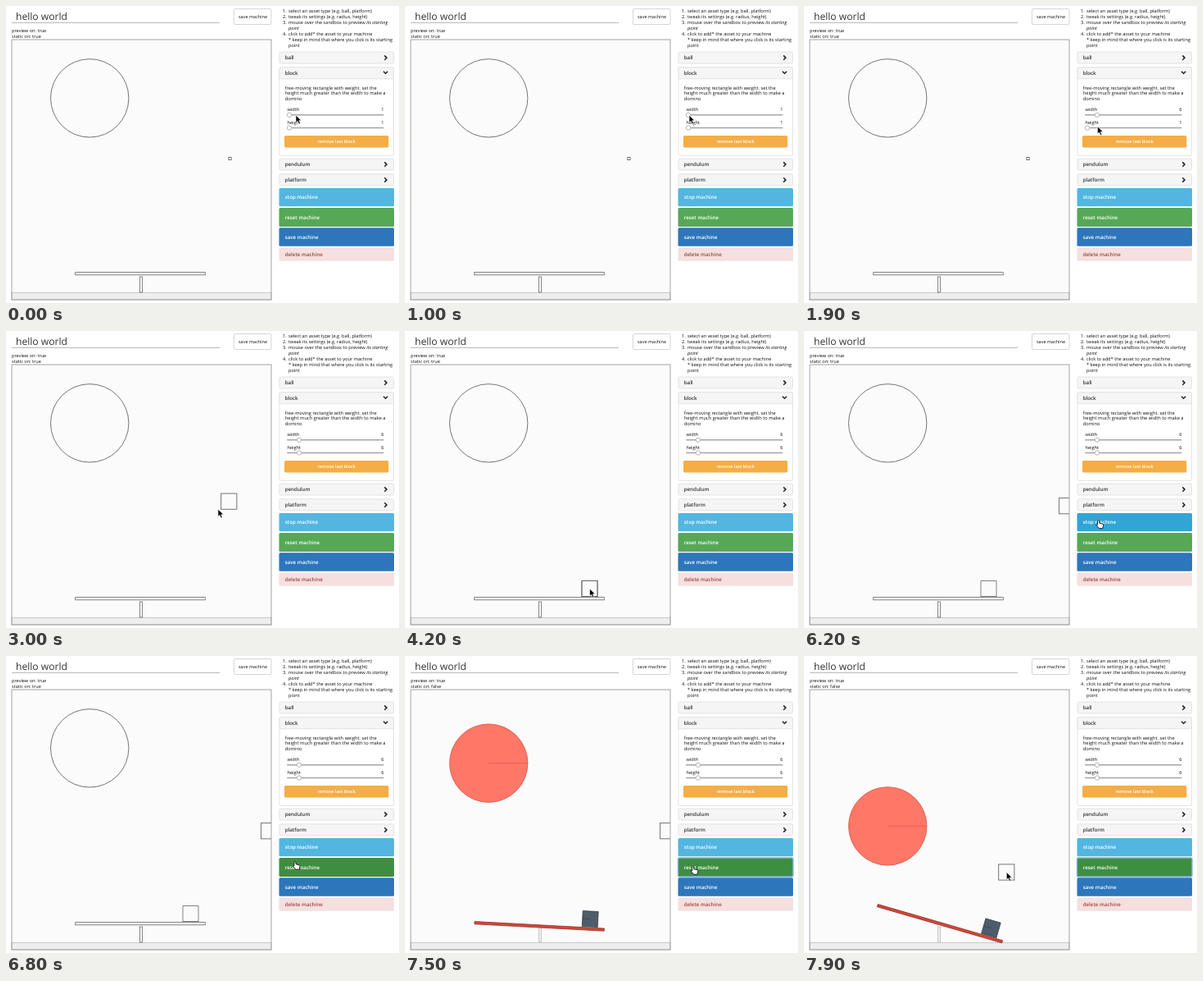
These frames come from a looping animation (480x362 px, 8 s). An HTML page:

```html
<!DOCTYPE html>
<html>
<head>
<meta charset="utf-8">
<style>
html, body { margin: 0; width: 100%; height: 100%; overflow: hidden; background: #fff; }
svg { display: block; width: 480px; height: 362px; }
text { font-family: "Open Sans", "Noto Sans", sans-serif; font-weight: 500; fill: #111; white-space: pre; text-rendering: geometricPrecision; }
.head { font-weight: 600; fill: #333; }
.btn { font-weight: 600; fill: #fff; }
.wire { fill: none; stroke: #666; stroke-width: .9; }
</style>
</head>
<body>
<svg id="stage" viewBox="0 0 480 362">
  <clipPath id="box"><rect x="7" y="41" width="317" height="317"/></clipPath>
  <g id="ui"></g>
  <g clip-path="url(#box)">
    <rect id="post" x="163.4" y="330" width="3.2" height="19" stroke-width=".8"/>
    <g id="seesaw" stroke-width=".8">
      <rect id="plank" x="-79.3" y="-1.6" width="158.6" height="3.2"/>
      <g id="block">
        <rect x="52" y="-21.6" width="19" height="19"/>
        <path id="tick" d="M61.5-12h-9" stroke-width=".8"/>
      </g>
    </g>
    <g id="ball" stroke-width=".9">
      <circle r="47.7"/>
      <path id="spoke" d="M0 0h47.7" stroke-width=".8"/>
    </g>
    <rect id="preview" class="wire"/>
  </g>
  <rect class="wire" x="7" y="41" width="317" height="317" style="stroke:#999"/>
  <g id="arrow"><path d="M0 0v9.2l2.1-1.9 1.6 3.6 1.7-.8-1.6-3.4h3z" fill="#000" stroke="#fff" stroke-width=".7"/></g>
  <g id="hand"><path d="M0 .8Q.8-.6 1.7.8l.5 3 4 1q1 .4.8 2l-.8 3.4h-4.3l-3.6-4q.2-1.2 1.6-.2z" fill="#fff" stroke="#111" stroke-width=".9"/></g>
</svg>
<script>
const $ = id => document.getElementById(id);
const ui = $('ui');

function set(el, attrs) {
  for (const k in attrs) el.setAttribute(k, attrs[k]);
  return el;
}
function add(tag, attrs) {
  return ui.appendChild(set(document.createElementNS('http://www.w3.org/2000/svg', tag), attrs));
}
function text(x, y, size, str, attrs) {
  const el = add('text', { x, y, 'font-size': size, ...attrs });
  el.innerHTML = str;
  return el;
}
function rect(x, y, width, height, fill, stroke = 'none', rx = 1.5) {
  return add('rect', { x, y, width, height, fill, stroke, rx, 'stroke-width': .8 });
}
const italic = s => `<tspan font-style="italic">${s}</tspan>`;

// left side
text(12, 16.8, 12.1, 'hello world', { style: 'fill:#333' });
add('path', { d: 'M7 20.3H261', stroke: '#aaa', 'stroke-width': .9 });
rect(278.5, 3.5, 45.5, 19, '#fff', '#ccc');
text(301.5, 15, 5.5, 'save machine', { 'text-anchor': 'middle' });
text(7, 32.3, 5.6, 'preview on: true');
const staticText = text(7, 39, 5.6, '');
rect(7, 41, 317, 317, '#fbfbfb', 'none', 0);
rect(7, 349.3, 317, 8.7, '#eee', '#bbb', 0);

// instructions
[
  ['1.', 'select an asset type (e.g. ball, platform)'],
  ['2.', 'tweak its settings (e.g. radius, height)'],
  ['3.', 'mouse over the sandbox to preview ' + italic('its starting')],
  ['', italic('point')],
  ['4.', 'click to add* the asset to your machine'],
  ['', '* keep in mind that where you click is its starting'],
  ['', 'point']
].forEach(([num, line], i) => {
  text(338, 8 + i * 6.95, 5.65, num);
  text(345, 8 + i * 6.95, 5.65, line);
});

// accordion
rect(334, 75, 139.5, 107.5, '#fff', '#ddd');
const heads = {};
[['ball', 56], ['block', 74.7], ['pendulum', 186], ['platform', 204.8]].forEach(([name, y]) => {
  rect(334, y, 139.5, 14, '#f5f5f5', '#ddd');
  heads[name] = text(340.7, y + 9.2, 6.2, name, { class: 'head' });
  const d = name == 'block' ? `M461 ${y + 5}l2.6 2.6 2.6-2.6` : `M462.3 ${y + 4.4}l2.7 2.7-2.7 2.7`;
  add('path', { d, fill: 'none', stroke: '#222', 'stroke-width': 1.5 });
});
['free-moving rectangle with weight. set the', 'height much greater than the width to make a', 'domino']
  .forEach((line, i) => text(340.7, 101.6 + i * 6.75, 5.75, line));

function slider(name, y) {
  text(343.5, y - 4.6, 5.6, name);
  const value = text(461.5, y - 4.6, 5.6, '', { 'text-anchor': 'end' });
  rect(343, y - .8, 118.5, 1.6, '#a5a5a5', 'none', .8);
  const knob = add('circle', { cy: y, r: 2.7, fill: '#fff', stroke: '#999', 'stroke-width': .7 });
  return v => {
    value.textContent = v;
    set(knob, { cx: 343.6 + v * 2.4 });
  };
}
const setWidth = slider('width', 132.8), setHeight = slider('height', 148.5);
rect(340, 158, 127.3, 14.4, '#f5ad45');
text(403.7, 167.2, 5.45, 'remove last block', { class: 'btn', 'text-anchor': 'middle' });

// machine buttons
function button(label, y, h, fill, attrs = { class: 'btn' }) {
  const el = rect(333.5, y, 140.5, h, fill);
  text(340.7, y + h / 2 + 2.1, 6.2, label, attrs);
  return el;
}
const stop = button('stop machine', 222, 22.3, '#53b6e0');
const reset = button('reset machine', 246, 23, '#56a857');
button('save machine', 270.3, 22.5, '#2d76bb');
button('delete machine', 294.5, 16.3, '#f5dfdf', { style: 'fill:#9c4644;font-weight:600' });

// pointer path: time, x, y
const path = [
  [0, 354, 133], [600, 347, 133], [1000, 347, 133], [1600, 358.5, 133], [1700, 358.5, 133],
  [1900, 358.5, 146.7], [2100, 347, 148], [2200, 347, 148], [2550, 358.5, 148], [2700, 358.5, 148],
  [2940, 272.5, 207.5], [3000, 259, 217], [3600, 227, 307], [3800, 225.5, 314], [4600, 225.5, 314],
  [4900, 321.5, 213], [5300, 366.5, 192], [5700, 366.5, 192], [6300, 357, 238], [6600, 352, 250],
  [6900, 352, 250], [7300, 350.8, 256], [7550, 350.8, 256], [7800, 247.3, 263.5], [8000, 247.3, 263.5]
];
function pointer(t) {
  const i = path.findIndex(p => p[0] > t), a = path[i - 1], b = path[i];
  const f = (t - a[0]) / (b[0] - a[0]);
  return [a[1] + (b[1] - a[1]) * f, a[2] + (b[2] - a[2]) * f];
}
const dragged = (t, start) => t < start ? 1 : t > start + 600 ? 6
  : Math.max(1, Math.min(6, Math.round(1 + (pointer(t)[0] - 347) / 2.3)));

function drawPreview(t) {
  const small = t < 2870, s = small ? 3.2 : 19.2;
  let [x, y] = pointer(Math.max(0, t - 60));
  if (small) [x, y] = [273.5, 186];
  else if (t > 4960 && t < 7700) [x, y] = [321.2, 213.2];
  set($('preview'), { x: x - s / 2, y: y - s / 2, width: s, height: s });
}

function drawMachine(t) {
  const fall = Math.max(0, t - 7205) / 695, live = fall > 0;
  const paint = (id, fill, stroke) => set($(id), { fill: live ? fill : 'none', stroke: live ? stroke : '#666' });
  paint('ball', '#ff7766', '#d9604f');
  paint('plank', '#c94a3d', '#a23228');
  paint('block', '#4e5d6c', '#36424e');
  paint('post', '#eee', '#bbb');
  set($('spoke'), { visibility: live ? 'visible' : 'hidden' });
  set($('tick'), { visibility: live ? 'visible' : 'hidden' });
  set($('block'), { visibility: t < 4000 ? 'hidden' : 'visible' });
  set($('ball'), { transform: `translate(102.2 ${112.3 + 94.8 * fall ** 1.925})` });
  const sag = 3.2 * Math.sin(Math.PI * Math.min(1, fall * 1.17));
  const angle = 16.1 * Math.min(1.03, fall ** 1.95);
  set($('seesaw'), { transform: `translate(${164 + 2 * fall ** 3} ${326.2 + sag}) rotate(${angle})` });
  staticText.textContent = 'static on: ' + !live;
}

function draw(t) {
  const [x, y] = pointer(t);
  const over = (a, b) => x > 334 && y > a && y < b;
  setWidth(dragged(t, 1000));
  setHeight(dragged(t, 2150));
  set(heads.pendulum, { 'text-decoration': over(186, 200) ? 'underline' : 'none' });
  set(heads.platform, { 'text-decoration': over(205, 219) ? 'underline' : 'none' });
  set(stop, { fill: over(222, 244) ? '#31a5d5' : '#53b6e0' });
  set(reset, {
    fill: t > 7100 || over(246, 269) ? '#3e8e41' : '#56a857',
    stroke: t > 7100 ? '#7fb4dc' : 'none',
    'stroke-width': 1.4
  });
  drawPreview(t);
  drawMachine(t);
  const hand = over(186, 312);
  for (const id of ['arrow', 'hand'])
    set($(id), { transform: `translate(${x} ${y})`, visibility: (id == 'hand') == hand ? 'visible' : 'hidden' });
}

const begin = performance.now();
function frame() {
  draw((performance.now() - begin) % 8000);
  requestAnimationFrame(frame);
}
frame();
</script>
</body>
</html>
```
